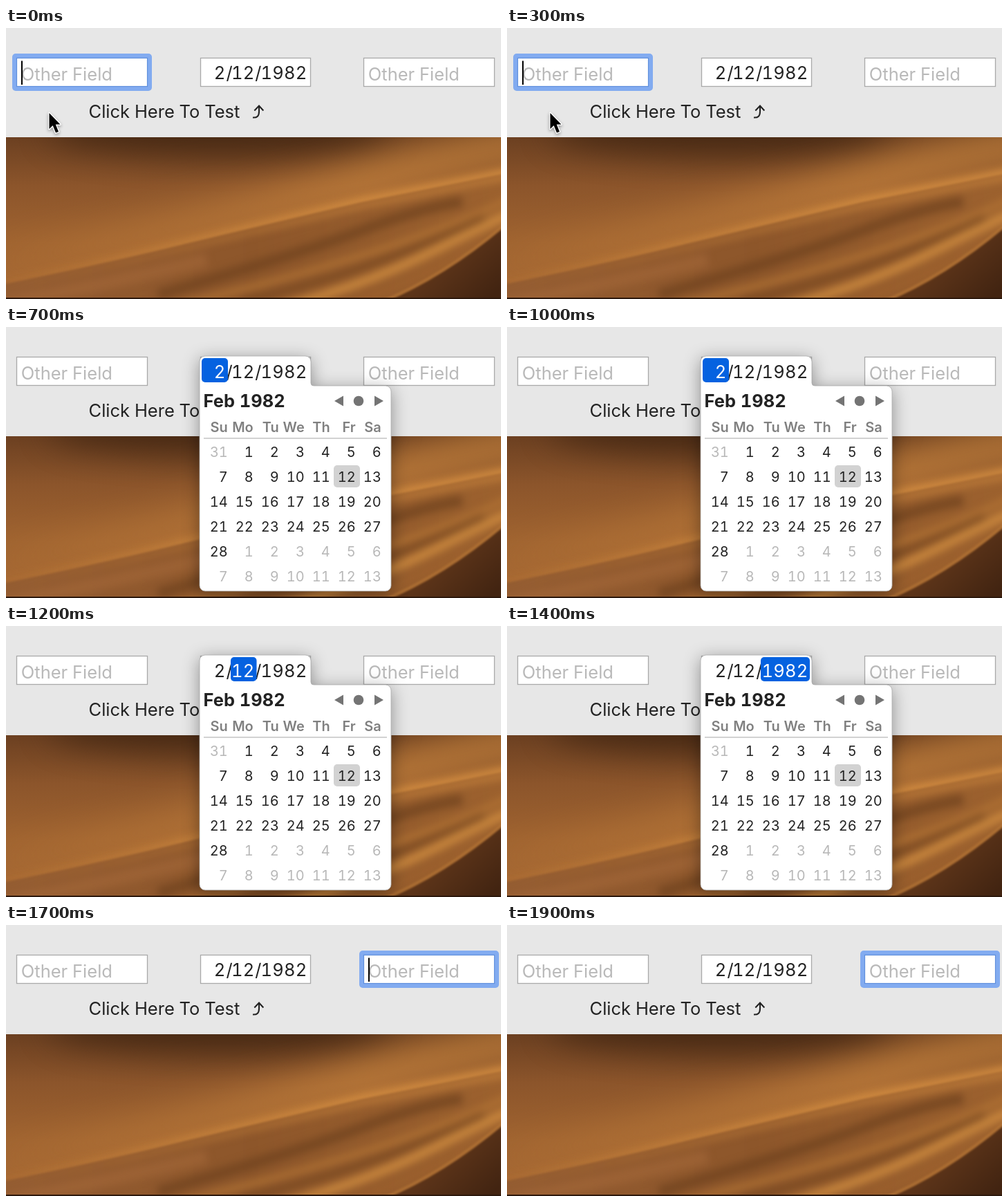
These frames come from a looping animation (716x392 px, 2000 ms). An HTML page:

```html
<!DOCTYPE html>
<html lang="en">
<head>
<meta charset="utf-8">
<title>Date picker focus</title>
<style>
  html, body { margin: 0; width: 100%; height: 100%; overflow: hidden; background: #e7e7e7; }
  svg { display: block; width: 716px; height: 392px; }
  text { font-family: Inter, "Open Sans", sans-serif; font-size: 25.5px; fill: #222; font-variant-numeric: tabular-nums; }
  filter { color-interpolation-filters: sRGB; }
  .end { text-anchor: end; }
  .hint { fill: #b9b9b9; }
  .field { fill: #fff; stroke: #a9a9a9; stroke-width: 1.3; }
  .ring { fill: #82abf0; }
  .focused { fill: #fff; stroke: #5f8fdc; stroke-width: 1.2; }
  .date { letter-spacing: .2px; }
  .white { fill: #fff; }
  .mark { fill: #0562e0; }
  .title { font-weight: 700; }
  .weekday { font-size: 20px; font-weight: 600; fill: #808080; }
  .day { font-size: 20px; }
  .other { fill: #b8b8b8; }
  .nav { fill: #747474; }
  .popup { filter: drop-shadow(0 5px 12px rgba(0, 0, 0, .38)); }

  .first, .picker, .month, .dayPart, .year, .third, .caret { animation: 2s step-end infinite; }
  .first { animation-name: first; }
  .picker { animation-name: picker; }
  .month { animation-name: month; }
  .dayPart { animation-name: dayPart; }
  .year { animation-name: year; }
  .third { animation-name: third; }
  .caret { animation-name: caret; }
  @keyframes first { 0% { opacity: 1 } 20%, 100% { opacity: 0 } }
  @keyframes picker { 0% { opacity: 0 } 20% { opacity: 1 } 75%, 100% { opacity: 0 } }
  @keyframes month { 0% { opacity: 0 } 20% { opacity: 1 } 55%, 100% { opacity: 0 } }
  @keyframes dayPart { 0% { opacity: 0 } 55% { opacity: 1 } 65%, 100% { opacity: 0 } }
  @keyframes year { 0% { opacity: 0 } 65% { opacity: 1 } 75%, 100% { opacity: 0 } }
  @keyframes third { 0% { opacity: 0 } 75%, 100% { opacity: 1 } }
  @keyframes caret { 0% { opacity: 0 } 75% { opacity: 1 } 90%, 100% { opacity: 0 } }
</style>
</head>
<body>
<svg viewBox="0 0 716 392">
  <defs>
    <linearGradient id="sky" x1="0" y1="0" x2="0" y2="1">
      <stop offset="0" stop-color="#6c4021"/>
      <stop offset=".3" stop-color="#8c552b"/>
      <stop offset=".65" stop-color="#9f6330"/>
      <stop offset="1" stop-color="#a66833"/>
    </linearGradient>
    <linearGradient id="dune" gradientUnits="userSpaceOnUse" x1="0" y1="0" x2="716" y2="0">
      <stop offset="0" stop-color="#925b31"/>
      <stop offset=".5" stop-color="#8d562a"/>
      <stop offset="1" stop-color="#9c612e"/>
    </linearGradient>
    <linearGradient id="glow" gradientUnits="userSpaceOnUse" x1="0" y1="0" x2="520" y2="0">
      <stop offset="0" stop-color="#d68f42" stop-opacity=".1"/>
      <stop offset="1" stop-color="#d68f42"/>
    </linearGradient>
    <linearGradient id="hollow" gradientUnits="userSpaceOnUse" x1="635" y1="340" x2="690" y2="400">
      <stop offset="0" stop-color="#5c3419"/>
      <stop offset="1" stop-color="#422411"/>
    </linearGradient>
    <filter id="wide" x="-30%" y="-150%" width="160%" height="400%"><feGaussianBlur stdDeviation="24"/></filter>
    <filter id="soft" x="-20%" y="-50%" width="140%" height="200%"><feGaussianBlur stdDeviation="6"/></filter>
    <filter id="fine" x="-10%" y="-20%" width="120%" height="140%"><feGaussianBlur stdDeviation="1.4"/></filter>
    <clipPath id="ground"><path d="M0 158H716V392H0Z"/></clipPath>
    <path id="ridge" d="M-30 376Q120 346 240 317T514 252Q610 233 740 207"/>
  </defs>

  <path fill="#e7e7e7" d="M0 0H716V158H0Z"/>

  <g clip-path="url(#ground)" fill="none">
    <path fill="url(#sky)" d="M0 158H716V392H0Z"/>
    <ellipse cx="310" cy="148" rx="250" ry="36" fill="#3a210f" opacity=".75" filter="url(#wide)"/>
    <path d="M-30 345Q300 280 514 222T780 165" stroke="url(#glow)" stroke-width="56" opacity=".65" filter="url(#wide)"/>
    <use href="#ridge" stroke="url(#glow)" stroke-width="18" opacity=".75" filter="url(#soft)"/>
    <path d="M-30 376Q120 346 240 317T514 252Q610 233 740 207V420H-30Z" fill="url(#dune)" filter="url(#fine)"/>
    <g filter="url(#soft)">
      <use href="#ridge" y="5" stroke="url(#glow)" stroke-width="9" opacity=".55"/>
      <path d="M-20 402Q140 372 290 335" stroke="#a3683a" stroke-width="20" opacity=".6"/>
      <path d="M220 386Q430 325 514 293T660 251" stroke="#70431f" stroke-width="16" opacity=".75"/>
      <path d="M230 406Q420 360 551 317T736 242" stroke="#b87836" stroke-width="8" opacity=".75"/>
      <path d="M340 396Q490 360 590 318T690 273" stroke="#75461f" stroke-width="9" opacity=".75"/>
      <path d="M390 406Q510 376 613 325T740 264" stroke="#cf8c40" stroke-width="13" opacity=".85"/>
      <path d="M490 402Q610 360 736 286" stroke="#a0632d" stroke-width="8" opacity=".6"/>
    </g>
    <path d="M536 401Q636 362 736 274V412H536Z" fill="url(#hollow)" filter="url(#fine)"/>
    <path d="M534 400Q634 361 734 274" stroke="#c07e39" stroke-width="4" opacity=".55" filter="url(#fine)"/>
    <path fill="#2d190d" d="M0 390H716V392H0Z"/>
  </g>

  <rect class="field" x="15.5" y="43.5" width="189" height="41"/>
  <rect class="field" x="281.5" y="43.5" width="159" height="41"/>
  <rect class="field" x="517.5" y="43.5" width="189" height="41"/>

  <g class="first">
    <rect class="ring" x="9" y="37" width="202" height="54" rx="5"/>
    <rect class="focused" x="15.5" y="43.5" width="189" height="41"/>
  </g>
  <g class="third">
    <rect class="ring" x="511" y="37" width="202" height="54" rx="5"/>
    <rect class="focused" x="517.5" y="43.5" width="189" height="41"/>
  </g>
  <text class="hint" x="21.8" y="76">Other Field</text>
  <text class="hint" x="523.8" y="76">Other Field</text>
  <path class="first" d="M22 47.5H24V82H22Z"/>
  <path class="caret" d="M524 47.5H526V82H524Z"/>

  <text x="119.5" y="130">Click Here To Test</text>
  <path d="M357 129.5C363.5 130 366 127 366 121V113M359.3 119.5L366 112.5L372.3 119.5" fill="none" stroke="#222" stroke-width="2.1"/>

  <g class="first" style="filter:drop-shadow(0 2px 2px rgba(0,0,0,.35))">
    <path d="M62.5 123V146L67.7 141L72 151.5L76 150L71.8 139.5H78.5Z" stroke="#fff" stroke-width="2.8" stroke-linejoin="round"/>
    <path d="M62.5 123V146L67.7 141L72 151.5L76 150L71.8 139.5H78.5Z"/>
  </g>

  <g class="picker">
    <path class="popup" fill="#fff" stroke="#aaa" stroke-width=".8" d="M288 42H433a8 8 0 0 1 8 8V81a4 4 0 0 0 4 4H549a8 8 0 0 1 8 8V374a8 8 0 0 1-8 8H288a8 8 0 0 1-8-8V50a8 8 0 0 1 8-8Z"/>
    <text class="title" x="285.5" y="116">Feb 1982</text>
    <path class="nav" d="M475 107L488 99.5V114.5ZM546 107L533 99.5V114.5Z"/>
    <circle class="nav" cx="510" cy="107" r="7.3"/>
    <path fill="#d2d2d2" d="M286 160H551V162H286Z"/>
    <rect fill="#d2d2d2" x="474" y="200" width="38" height="32" rx="5"/>
    <g id="days"></g>
  </g>

  <g class="end">
    <text class="date" x="317.5" y="74">2</text>
    <text class="date" x="327.8" y="74">/</text>
    <text class="date" x="359.5" y="74">12</text>
    <text class="date" x="369.7" y="74">/</text>
    <text class="date" x="435.5" y="74">1982</text>
  </g>
  <g class="month end">
    <rect class="mark" x="283" y="45" width="38" height="35" rx="5"/>
    <text class="date white" x="317.5" y="74">2</text>
  </g>
  <g class="dayPart end">
    <rect class="mark" x="325" y="45" width="37.5" height="35" rx="5"/>
    <text class="date white" x="359.5" y="74">12</text>
  </g>
  <g class="year end">
    <rect class="mark" x="367" y="45" width="71" height="35" rx="5"/>
    <text class="date white" x="435.5" y="74">1982</text>
  </g>
</svg>
<script>
  const days = document.getElementById('days');

  function addCell(label, column, y, className) {
    const cell = document.createElementNS('http://www.w3.org/2000/svg', 'text');
    cell.setAttribute('class', 'end ' + className);
    cell.setAttribute('x', 320.8 + column * 37);
    cell.setAttribute('y', y);
    cell.textContent = label;
    days.append(cell);
  }

  ['Su', 'Mo', 'Tu', 'We', 'Th', 'Fr', 'Sa'].forEach((name, i) => addCell(name, i, 152, 'weekday'));

  for (let i = 0; i < 42; i++) {
    const date = new Date(1982, 0, 31 + i);
    const inMonth = date.getMonth() === 1;
    addCell(date.getDate(), i % 7, 188 + Math.floor(i / 7) * 36, inMonth ? 'day' : 'day other');
  }
</script>
</body>
</html>
```
